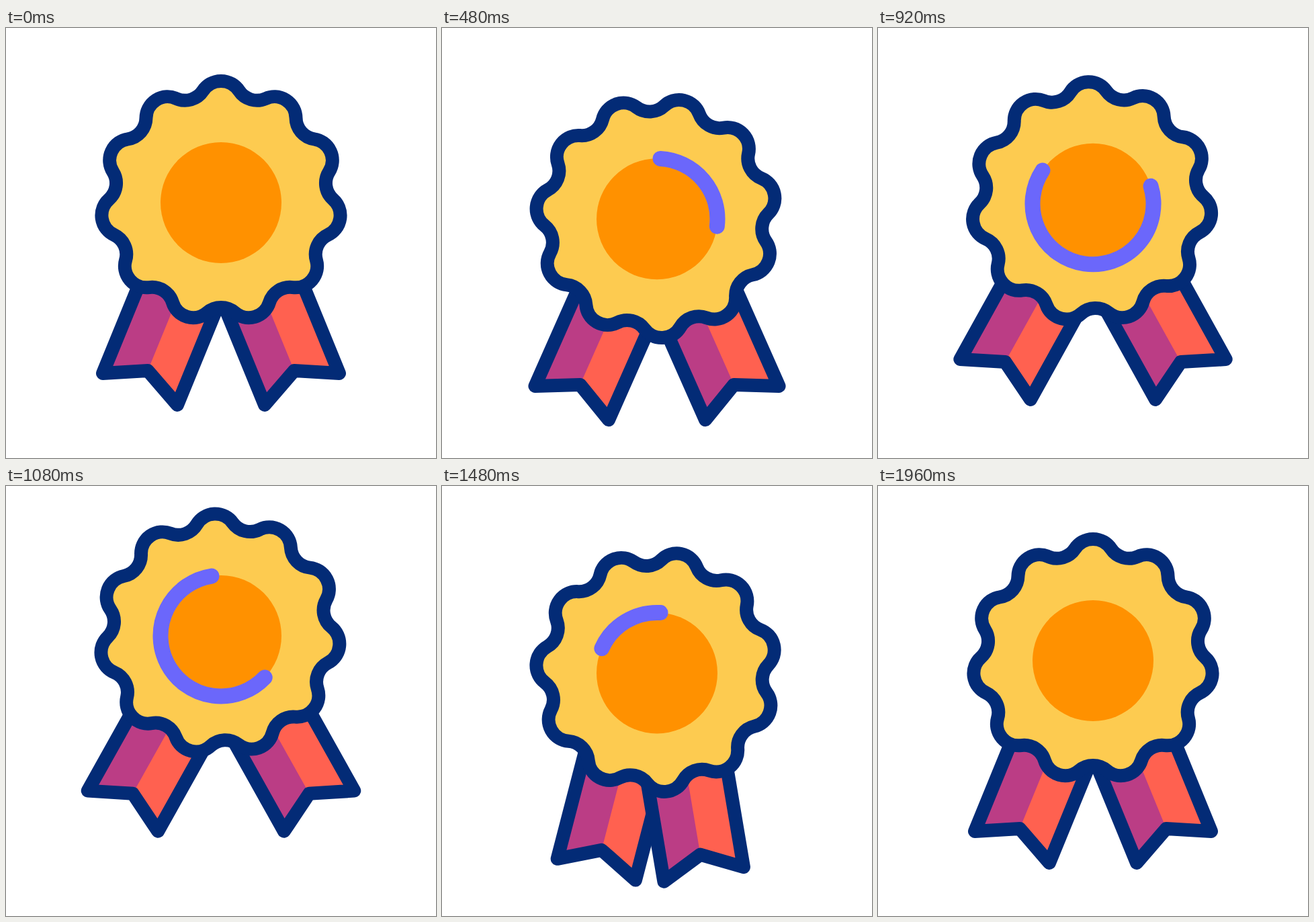
Write an HTML page that moves like this. It is 640x640 px and loops after 2 s.

```html
<!DOCTYPE html>
<html lang="en">
<head>
<meta charset="utf-8">
<title>Award rosette</title>
<style>
  html, body { margin: 0; width: 100%; height: 100%; overflow: hidden; background: #fff; }
  svg { display: block; width: 100%; height: 100%; }
  .line { fill: none; stroke: #032b76; stroke-width: 20; stroke-linejoin: round; }
</style>
</head>
<body>
<svg viewBox="0 0 640 640">
  <g id="medal">
    <g id="left"></g>
    <g id="right"></g>
    <g id="rosette">
      <path id="edge" class="line" style="fill:#fdcb50" transform="translate(0 -2)"/>
    </g>
    <circle r="90" fill="#ff9100"/>
    <path id="ring" fill="none" stroke="#6b67fb" stroke-width="23" stroke-linecap="round"/>
  </g>
</svg>
<script>
const LOOP = 2000;
const LOBES = 11;
const PURPLE = '#bb3d85', CORAL = '#ff6150';
const PIVOT = [4, 60];
const $ = id => document.getElementById(id);

// Point at a clockwise angle (degrees) from twelve o'clock.
function polar(radius, degrees) {
  const a = degrees * Math.PI / 180;
  return [radius * Math.sin(a), -radius * Math.cos(a)].map(v => v.toFixed(2)).join(' ');
}

// Equal arcs, alternately bulging out and in.
function rosettePath() {
  const step = 360 / LOBES, half = 9.23, radius = 166.8, bend = 32;
  let d = 'M' + polar(radius, -half);
  for (let i = 0; i < LOBES; i++) {
    d += `A${bend} ${bend} 0 0 1 ${polar(radius, i * step + half)}`;
    d += `A${bend} ${bend} 0 0 0 ${polar(radius, (i + 1) * step - half)}`;
  }
  return d + 'Z';
}

function ribbon(side, outerColor, innerColor) {
  const corner = [-176, 254], notch = [-109, 250], tip = [-65, 301];
  const lift = ([x, y]) => [x + 83, y - 203];
  const shape = points => 'M' + points.map(([x, y]) => [x * side, y]).join('L') + 'Z';
  const outline = shape([corner, notch, tip, lift(tip), lift(notch), lift(corner)]);
  return `<path fill="${outerColor}" d="${outline}"/>` +
    `<path fill="${innerColor}" d="${shape([notch, tip, lift(tip), lift(notch)])}"/>` +
    `<path class="line" d="${outline}"/>`;
}

// Keys are [time, value] pairs with smooth easing between them.
function track(t, keys) {
  let [t0, v0] = keys[0];
  if (t <= t0) return v0;
  for (const [t1, v1] of keys) {
    if (t < t1) {
      const u = (t - t0) / (t1 - t0);
      return v0 + (v1 - v0) * u * u * (3 - 2 * u);
    }
    [t0, v0] = [t1, v1];
  }
  return v0;
}

function drawRing(t) {
  const from = track(t, [[560, 0], [1840, 360]]);
  const to = track(t, [[120, 0], [1200, 360]]);
  const span = to - from;
  if (span < 0.01) return $('ring').setAttribute('d', '');
  const origin = 3.2;
  $('ring').setAttribute('d',
    `M${polar(90, origin + from)}A90 90 0 ${span > 180 ? 1 : 0} 1 ${polar(90, origin + to)}`);
}

function render(t) {
  const y = track(t, [[200, 260], [720, 303.3], [1120, 220.8], [1520, 280], [1960, 260]]);
  const spin = track(t, [[160, 0], [870, 31], [1000, 31], [1830, 0]]);
  const swing = low => track(t, [[240, 0], [1000, 7], [1080, 7], [1640, low], [1960, 0]]);
  const [px, py] = PIVOT;

  $('medal').setAttribute('transform', `translate(320 ${y})`);
  $('rosette').setAttribute('transform', `rotate(${spin} 0 -6)`);
  $('left').setAttribute('transform', `rotate(${swing(-11.3)} ${px} ${py})`);
  $('right').setAttribute('transform', `rotate(${-swing(-17.5)} ${-px} ${py})`);
  drawRing(t);
}

$('left').innerHTML = ribbon(1, PURPLE, CORAL);
$('right').innerHTML = ribbon(-1, CORAL, PURPLE);
$('edge').setAttribute('d', rosettePath());

const start = performance.now();
function frame() {
  render((performance.now() - start) % LOOP);
  requestAnimationFrame(frame);
}
render(0);
requestAnimationFrame(frame);
</script>
</body>
</html>
```
